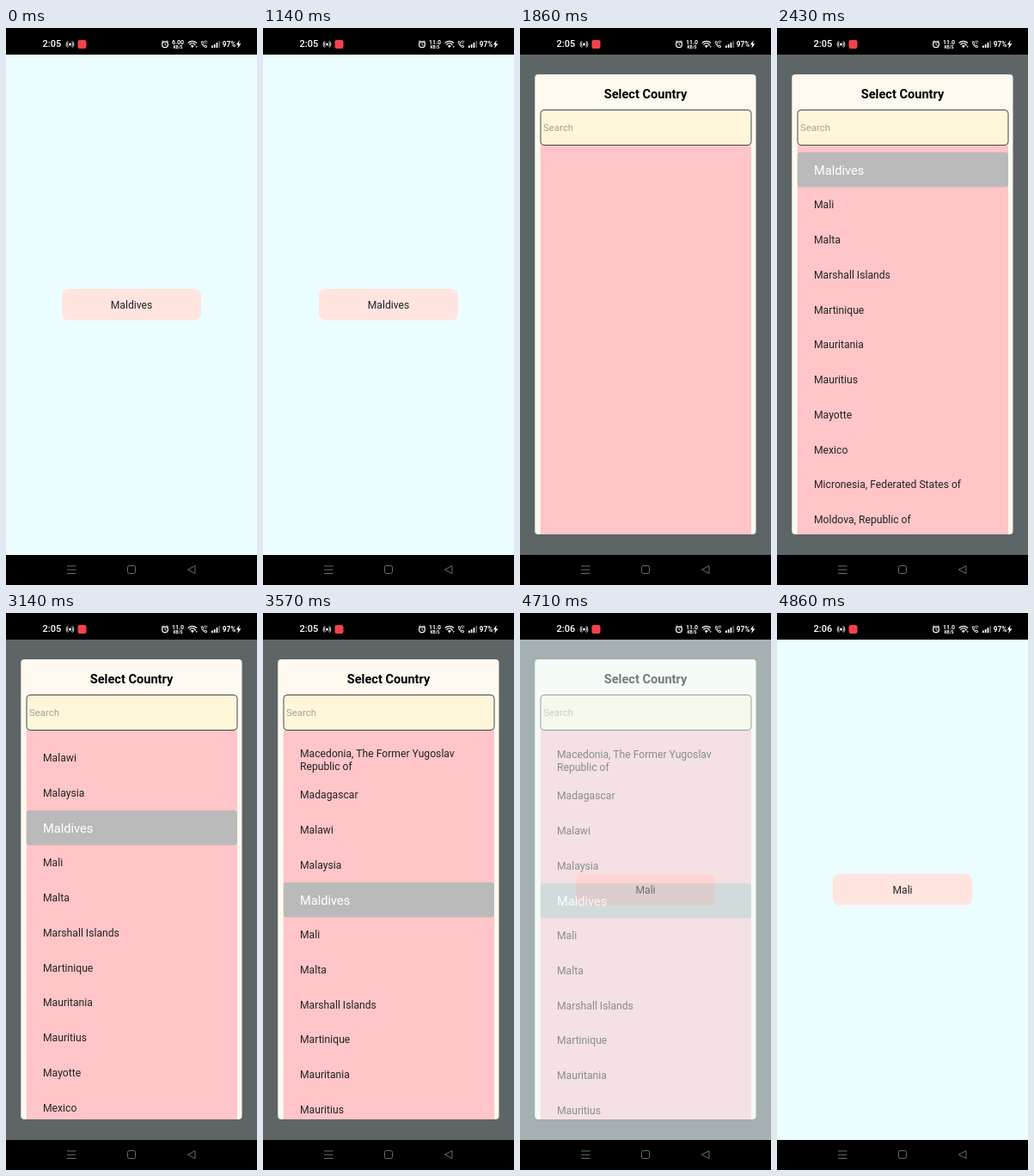
Write an HTML page that moves like this. It is 292 px wide and 649 px high and loops after 5280 ms.

```html
<!DOCTYPE html>
<html lang="en">
<head>
<meta charset="utf-8">
<title>Country picker</title>
<style>
html, body { margin: 0; width: 100%; height: 100%; overflow: hidden; background: #000; }
svg { display: block; width: 292px; height: 649px; font-family: Roboto, sans-serif; font-size: 12.17px; }
.mid { text-anchor: middle; }
.line { fill: none; stroke: #fff; stroke-linecap: round; }
.nav { fill: none; stroke: #6d6d6d; }
</style>
</head>
<body>
<svg viewBox="0 0 292 649">
  <defs><clipPath id="view"><rect x="23.5" y="136.5" width="246" height="453.5"/></clipPath></defs>
  <rect width="292" height="649"/>
  <rect y="31" width="292" height="583" fill="#ebfdff"/>
  <rect x="65" y="304" width="162" height="36.5" rx="8" fill="#ffe4e0"/>
  <text id="choice" class="mid" x="146" y="327" fill="#222"></text>

  <g id="modal">
    <rect y="31" width="292" height="583" opacity=".6"/>
    <rect x="17.3" y="54" width="257.2" height="536" rx="4" fill="#fffaf0"/>
    <text class="mid" x="146" y="81.6" font-size="14.6" font-weight="700">Select Country</text>
    <g clip-path="url(#view)">
      <rect x="23.5" y="136.5" width="245.5" height="454" fill="#ffc5c9"/>
      <g id="list"></g>
    </g>
    <rect x="24" y="95.5" width="245" height="41" rx="4" fill="#fff6da" stroke="#444"/>
    <text x="27" y="120" font-size="11.36" fill="#a5a199">Search</text>
  </g>

  <g fill="#fff">
    <text id="clock" x="42.5" y="22.3" font-size="11" font-weight="500"></text>
    <circle cx="74.5" cy="19" r="1.5"/>
    <path class="line" d="M72.3 16.6a3.3 3.3 0 0 0 0 4.8M76.7 16.6a3.3 3.3 0 0 1 0 4.8M71.3 15.6a5 5 0 0 0 0 6.8M77.7 15.6a5 5 0 0 1 0 6.8" stroke-width=".8"/>
    <rect x="83.5" y="14" width="10" height="10" rx="2.2" fill="#f5424a"/>
    <circle class="line" cx="185" cy="19.3" r="3.4" stroke-width="1.2"/>
    <path class="line" d="M185 17.5v2l1.3.8M181.2 16.2l1.7-1.5M188.8 16.2l-1.7-1.5" stroke-width=".9"/>
    <g class="mid" font-weight="700">
      <text id="speed" x="200" y="19" font-size="7"></text>
      <text x="200" y="24" font-size="4.9">KB/S</text>
    </g>
    <path class="line" d="M212 17.2a7 7 0 0 1 9.6 0M213.7 19.2a4.5 4.5 0 0 1 6.2 0" stroke-width="1.2"/>
    <path d="M214.8 20.8a3 3 0 0 1 4 0l-2 2.4z"/>
    <path id="up" d="M219 20.6l1.1-1.8 1.1 1.8z"/>
    <path id="down" d="M220.6 21.2l1.1 1.8 1.1-1.8z"/>
    <path class="line" d="M227.3 16.2c.2 3.6 2.6 6.2 6 6.4l.4-1.6-1.8-.8-1 .8c-1-.5-1.6-1.3-2-2.2l.8-.9-.7-1.8z" stroke-width=".9"/>
    <path class="line" d="M230.2 15.8a3.2 3.2 0 0 1 4 0M231.2 17.5a1.6 1.6 0 0 1 2 0" stroke-width=".8"/>
    <path d="M239 20.5h1.7v2.5h-1.7zM241.8 19h1.7v4h-1.7zM244.6 17h1.7v6h-1.7z"/>
    <path d="M247.4 15h1.7v8h-1.7z" opacity=".4"/>
    <text x="251.8" y="22" font-size="8.2" font-weight="700">97%</text>
    <path d="M271.8 14l-4 5.6h2.4l-1 4.4 4.2-5.8h-2.6z"/>
  </g>

  <path class="nav" d="M71 626.9h10.5M71 631.2h10.5M71 635.5h10.5"/>
  <rect class="nav" x="141.5" y="626.5" width="9" height="9" rx="1.8"/>
  <path class="nav" d="M220 626.6v9l-8.6-4.5z" stroke-linejoin="round"/>
</svg>
<script>
const LOOP = 5280, PITCH = 40.75, FIRST = 165.2, SELECTED = 4;
const rows = ['Macedonia, The Former Yugoslav|Republic of', 'Madagascar', 'Malawi', 'Malaysia',
  'Maldives', 'Mali', 'Malta', 'Marshall Islands', 'Martinique', 'Mauritania', 'Mauritius',
  'Mayotte', 'Mexico', 'Micronesia, Federated States of', 'Moldova, Republic of'];
const $ = id => document.getElementById(id);

const label = (text, y, style = 'fill="#222"') => `<text x="43" y="${y}" ${style}>${text}</text>`;

$('list').innerHTML = rows.map((name, i) => {
  const mid = FIRST + (i - SELECTED) * PITCH;
  if (i === SELECTED)
    return `<rect x="23.5" y="${mid - PITCH / 2}" width="245.5" height="${PITCH}" rx="4" fill="#bababa"/>`
      + label(name, mid + 5.8, 'fill="#fff" font-size="14.6"');
  const lines = name.split('|');
  return lines.map((s, k) => label(s, mid + 4.4 + (k - (lines.length - 1) / 2) * 14.4)).join('');
}).join('');

// Held values: [start time, value] pairs, the last one reached applies.
const held = (t, steps) => steps.reduce((v, [at, next]) => t >= at ? next : v, 0);
const fade = [[1710, .32], [1860, 1], [4710, .5], [4860, 0]];
const listFade = [[2000, .5], [2140, 1]];
const scroll = [[3140, 85], [3290, 138], [3430, 154], [3570, 168.8], [3710, 169.8]];

function draw(now) {
  const t = now % LOOP;
  $('modal').setAttribute('opacity', held(t, fade));
  $('list').setAttribute('opacity', held(t, listFade));
  $('list').setAttribute('transform', `translate(0 ${held(t, scroll)})`);
  $('choice').textContent = t < 4710 ? 'Maldives' : 'Mali';
  $('clock').textContent = t < 4140 ? '2:05' : '2:06';
  $('speed').textContent = t < 1140 ? '6.00' : '11.0';
  $('up').setAttribute('opacity', t < 1570 ? .4 : 1);
  requestAnimationFrame(draw);
}
draw(0);
</script>
</body>
</html>
```
